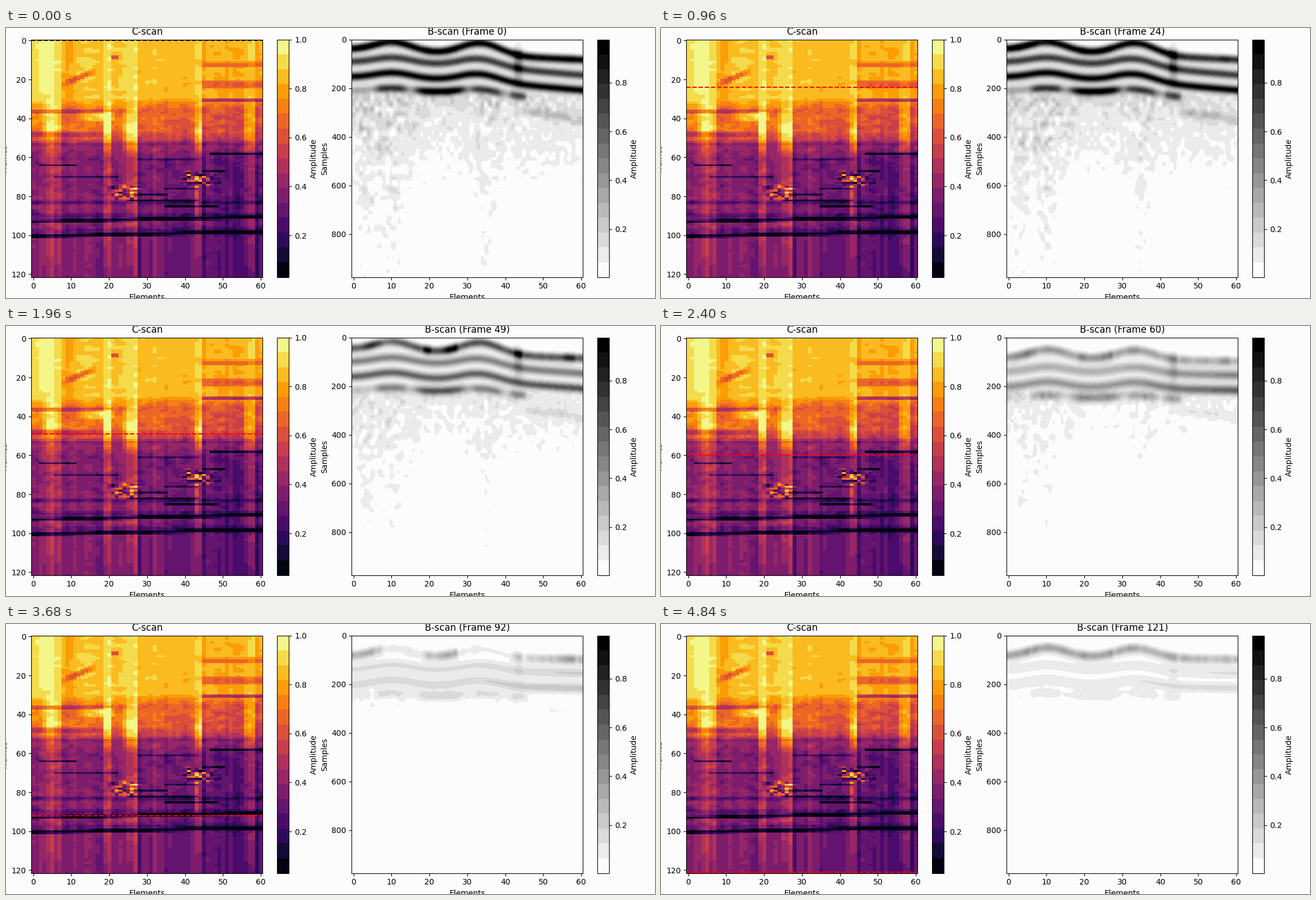
A matplotlib script for the animation above (4.88 s loop, 1159 by 483 pixels).

```python
import numpy as np
import matplotlib.pyplot as plt
from matplotlib.animation import FuncAnimation
from matplotlib.colors import LinearSegmentedColormap, ListedColormap

W, H, DPI = 1159, 483, 100
FRAMES, ELEMS, DEPTH, LEVELS = 122, 61, 977, 16
BG = "#fcfcfc"
rng = np.random.default_rng(7)
x = np.arange(ELEMS)
rows = np.arange(FRAMES)[:, None]
s = np.linspace(2, DEPTH - 2, 244)[:, None]


def gauss(d, width):
    return np.exp(-0.5 * (d / width) ** 2)


def plateau(d, half):
    return np.exp(-(d / half) ** 6)


def step(d, soft):
    return 0.5 + 0.5 * np.tanh(d / soft)


def lerp(a, b, t):
    return a + (b - a) * t


def smooth(a, size, axis):
    pad = [(0, 0)] * a.ndim
    pad[axis] = (size // 2, size // 2)
    kernel = np.hanning(size + 2)[1:-1]
    return np.apply_along_axis(np.convolve, axis, np.pad(a, pad, mode="edge"),
                               kernel / kernel.sum(), mode="valid")


def make_cscan():
    """Bright rows fading with scan position, bright columns, dark streaks."""
    def by_row(*values):
        return np.interp(rows, [0, 29, 35, 47, 53, 60, 100, 121], values)

    left = by_row(.90, .90, .76, .74, .47, .40, .41, .40)
    right = by_row(.82, .80, .58, .56, .44, .28, .26, .25)
    c = lerp(left, right, x / 60)

    # columns that stay bright longer than their neighbours
    peak = by_row(.06, .06, .20, .24, .20, .14, .14, .05)
    for center, half in ((5, 2.2), (19.5, 1.2), (25.8, 1.9), (43.7, .8), (57, 1.5)):
        lasting = .12 * plateau(rows - 50, 8) if 15 < center < 50 else 0
        c = c + (peak + lasting) * plateau(x - center, half)
    c -= .07 * plateau(x - 9.5, 2) * step(45 - rows, 5)
    c += .05 * plateau(x - 2, 2) * step(28 - rows, 3)
    c += .18 * plateau(x - 17, 5) * plateau(rows - 39, 2.5)

    # streaks on the right half, the left half, and across
    r_side, l_side = step(x - 44.5, .4), step(20 - x, 8)
    for row, half, drop, side in ((12.3, 1.3, .17, r_side), (22.5, 2, .18, r_side),
                                  (30.5, 1, .28, r_side), (36.5, 1, .2, l_side),
                                  (48, 1.2, .2, l_side), (53, 1, .1, 1), (83, 1, .13, 1),
                                  (90, 1.2, .12, 1), (98, 2, .1, 1)):
        c -= drop * plateau(rows - row, half) * side
    for row in (93, 100.5):
        c -= .34 * plateau(rows - (row - 2.4 * x / 60), .9)
    for row in range(58, 88, 3):
        start, size = rng.integers(0, 50), rng.integers(6, 20)
        c[row, start:start + size] -= rng.uniform(.1, .3)
    c -= .2 * plateau(rows - 19 + (x - 12) * .8, 1.6) * plateau(x - 12, 4)
    c -= .25 * plateau(rows - 8.5, 1) * plateau(x - 21.5, 1)

    # grain: soft blocks above, fixed columns in the tail
    grain = smooth(smooth(rng.normal(size=c.shape), 3, 0), 3, 1)
    c += grain * np.interp(rows, [0, 28, 34, 98, 103], [.025, .03, .065, .065, .012])
    c += rng.normal(size=ELEMS) * by_row(.01, .01, .02, .02, .03, .03, .04, .04)
    for row, col in ((71, 43.5), (78, 24)):
        spot = plateau(rows - row, 4) * plateau(x - col, 4)
        c += .22 * spot * rng.normal(.3, 1, c.shape)
    c += .15 * plateau(rows - 82, 9) * plateau(x - 43, .6)
    return np.clip(c, .03, 1)


def texture():
    coarse = rng.normal(size=(49, ELEMS))
    at = np.linspace(0, 48, len(s))
    return np.stack([np.interp(at, np.arange(49), col) for col in coarse.T], axis=1)


cscan = make_cscan()
base = texture()
fields = [texture() for _ in range(8)]
speckle = gauss(x - 3, 1.6) + gauss(x - 10, 2.2) + gauss(x - 35.5, 2) + .6 * gauss(x - 7, 5)
patches = .25 * step(45 - x, 2) + sum(
    a * plateau(x - c, h) for c, h, a in ((10, 4, .45), (23, 6.5, .7), (35, 4, .4), (43.6, 2, .4)))


def surface(late):
    """First echo: a tilted line with two humps, deeper and flatter later on."""
    line = lerp(40, 85, late) + lerp(.7, .2, late) * x
    return line - 38 * gauss(x - 10.5, 5) - lerp(50, 40, late) * gauss(x - 33.5, 5.2)


def bscan(n):
    late = np.interp(n, [47, 59], [0, 1])
    fade = np.interp(n, [0, 28, 60, 90, 121], [1, 1, .38, .15, .09])
    top = surface(late)
    tilt = np.clip((x - 30) / 30, 0, 1)
    drift = lerp(28, 6, late) * tilt
    width = lerp(12, 14, late)

    amp = np.median(cscan[max(n - 1, 0):n + 2], axis=0)
    v = lerp(1.06, .85, late) * amp * gauss(s - top, width)
    for offset, flat, strength in ((68, .6, .66), (130, .6, .88), (196, .35, patches)):
        center = flat * top + offset + 22 * late + drift
        v += strength * fade * (1 + .6 * late * tilt) * gauss(s - center, width)
    v += .35 * fade * gauss(x - 43.5, .8) * gauss(s - 100 - 30 * late, 50)
    v += .15 * fade * gauss(s - (295 + 2.5 * (x - 46)), 13) * step(x - 46, 1)

    k, f = divmod(n / 20, 1)
    noise = .75 * base + .66 * lerp(fields[int(k)], fields[int(k) + 1], f)
    below = step(s - 225, 20)
    haze = .15 * np.exp(-np.clip(s - 225, 0, None) / 270) * (1 + .38 * noise)
    grain = .06 * speckle * np.exp(-s / 1500) * (.6 + .8 * noise)
    v += fade ** .7 * below * (haze + grain)
    v += .08 * fade ** .3 * step(s - top + 15, 10) * (1 - below)
    return np.clip(v, .003, .977)


plt.rcParams["font.family"] = "DejaVu Sans"
fig = plt.figure(figsize=(W / DPI, H / DPI), dpi=DPI, facecolor=BG)
grays = LinearSegmentedColormap.from_list("grays", [BG, "black"], LEVELS)
inferno = ListedColormap(plt.get_cmap("inferno")((np.arange(LEVELS) + .5) / LEVELS))


def box(left, width, top=20.6, height=425):
    return fig.add_axes([left / W, 1 - (top + height) / H, width / W, height / H])


def panel(left, data, cmap, lim, extent, interp, ylabel, yticks, bar_ticks):
    ax = box(left, 413)
    im = ax.imshow(data, cmap=cmap, vmin=lim[0], vmax=lim[1], extent=extent,
                   aspect="auto", interpolation=interp)
    ax.set(xlabel="Elements", ylabel=ylabel, xticks=range(0, 61, 10), yticks=yticks)
    bar = fig.colorbar(im, cax=box(left + 438.8, 21.2), ticks=bar_ticks)
    bar.set_label("Amplitude")
    return ax, im


ax_c, _ = panel(45.4, cscan, inferno, (.03, 1), (-.5, 60.5, 121.5, -.5), "nearest",
                "Frames", range(0, 121, 20), [.2, .4, .6, .8, 1])
ax_b, im_b = panel(617.4, bscan(0), grays, (.003, .977), (-.5, 60.5, DEPTH, 0), "bilinear",
                   "Samples", range(0, 801, 200), [.2, .4, .6, .8])
ax_c.set_title("C-scan")
title = ax_b.set_title("")
cursor = ax_c.axhline(0, color="red", ls="--", lw=1.5)


def update(n):
    im_b.set_data(bscan(n))
    title.set_text(f"B-scan (Frame {n})")
    cursor.set_ydata([n, n])
    cursor.set_color("red" if n else "black")
    return im_b, title, cursor


anim = FuncAnimation(fig, update, frames=FRAMES, interval=40, repeat=True,
                     repeat_delay=0, blit=False)
plt.show()
```
